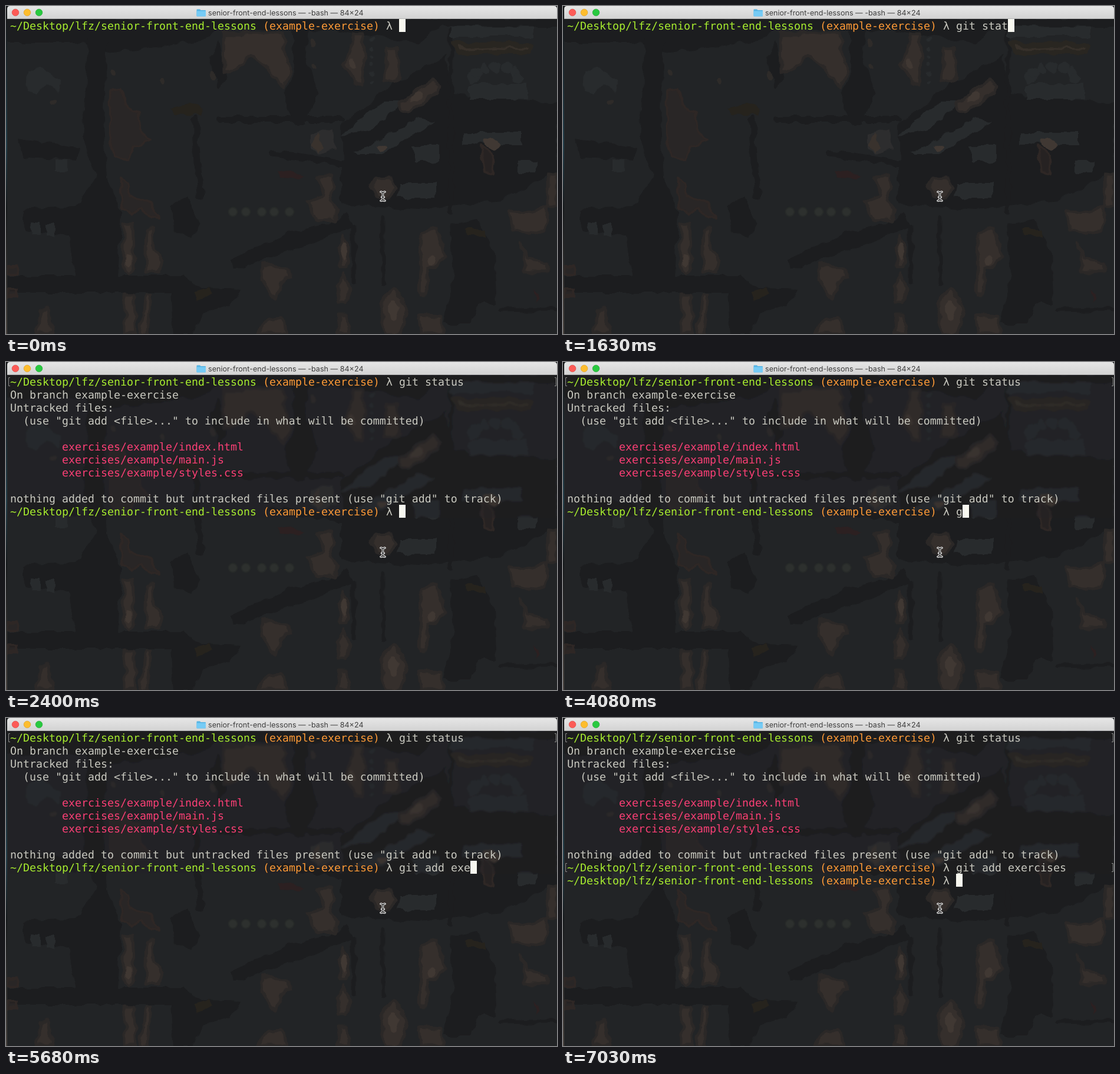
An HTML page that plays this animation: 935 px wide and 556 px high, repeating every 8 s.

```html
<!DOCTYPE html>
<html lang="en">
<head>
<meta charset="utf-8">
<title>Terminal</title>
<style>
  html, body { margin: 0; width: 100%; height: 100%; overflow: hidden; background: #222426; }
  svg { display: block; width: 935px; height: 556px; }
  text { white-space: pre; text-rendering: geometricPrecision; }
  #rows text { font: 18.27px "DejaVu Sans Mono", monospace; font-variant-ligatures: none; fill: #c9c9c0; }
  #rows .path { fill: #a7ec2f; }
  #rows .branch { fill: #fd9a37; }
  #rows .file { fill: #fa3f75; }
  .mark { fill: none; stroke: #8b8c8a; }
  .title { font: 12.6px Inter, sans-serif; fill: #3f3f3f; }
  .dark { fill: #1c1d1f; }
  .darkline { fill: none; stroke: #1c1d1f; stroke-linecap: round; }
  .brown { fill: #352f2c; stroke: #2b2827; stroke-width: 5; stroke-linejoin: round; }
  .rust { fill: #30292680; stroke: #2e2725; stroke-width: 4; stroke-linejoin: round; }
  .grey { fill: #282b2d; }
  .glow { fill: #403833; }
</style>
</head>
<body>
<svg viewBox="0 0 935 556">
  <defs>
    <linearGradient id="bar" x2="0" y2="1">
      <stop stop-color="#e6e6e6"/><stop offset="1" stop-color="#d2d2d2"/>
    </linearGradient>
    <linearGradient id="edge" x2="0" y2="1">
      <stop stop-color="#17191b"/><stop offset=".4" stop-color="#24404c"/>
      <stop offset=".6" stop-color="#15181a"/><stop offset="1" stop-color="#4a4541"/>
    </linearGradient>
    <filter id="wavy" x="0" y="0" width="935" height="556" filterUnits="userSpaceOnUse" color-interpolation-filters="sRGB">
      <feTurbulence type="fractalNoise" baseFrequency=".045" numOctaves="2" seed="4" result="noise"/>
      <feDisplacementMap in="SourceGraphic" in2="noise" scale="14" xChannelSelector="R" yChannelSelector="G"/>
    </filter>
    <filter id="soft" x="0" y="0" width="935" height="556" filterUnits="userSpaceOnUse"><feGaussianBlur stdDeviation="1.6"/></filter>
    <clipPath id="printed"><rect x="4" y="22" width="930" height="242"/></clipPath>
  </defs>

  <g id="scene">
    <rect width="935" height="556" fill="#222426"/>
    <g filter="url(#wavy)">
      <g class="dark">
        <path d="M0 22H935V34H740L700 62 620 52 560 42 360 38 330 60 180 78 130 62 0 62Z"/>
        <path d="M484 40H514L508 90 530 150 506 200H490L470 150 490 110Z"/>
        <path d="M140 60H172L165 190 172 290 196 350 190 460H120L105 390 30 380V345L120 340 155 290 130 225Z"/>
        <path d="M570 200L660 130 745 85 760 150 935 165V280L840 330 700 345 570 335Z"/>
        <path d="M0 458H300L330 478 400 480 380 508 335 520 315 556H285L280 486H0Z"/>
        <path d="M280 335L310 325 330 370 315 395 285 380ZM380 430L480 385 540 370 580 350 590 375 540 395 450 425 390 448Z"/>
        <path d="M752 370L800 360 830 420 835 505H800L790 540H745L760 450Z"/>
        <path d="M20 225L125 240 120 262 30 255ZM360 60L376 120 360 140 345 90Z"/>
      </g>
      <g class="darkline">
        <path stroke-width="10" d="M365 193H570M320 190L330 325M450 250L560 265 620 265"/>
        <path stroke-width="7" d="M590 375V470M640 360V470M840 515H935M755 40V350"/>
      </g>
      <g class="grey">
        <path d="M570 220L640 160 680 160 620 210ZM590 250L700 190 730 195 640 250ZM690 235H735V265H695Z"/>
        <path d="M785 132H885V158H785ZM775 215H875V235H775ZM670 300H730V325H665Z"/>
        <path d="M755 35H895V52H755ZM870 262H900V282H870Z"/>
        <path d="M36 112L60 105 95 125 90 145 70 132 50 150 34 145Z"/>
        <path d="M40 365H58V388H42ZM68 370H82V390H68ZM82 262H104V278H82Z"/>
      </g>
      <g id="ring" class="grey"></g>
      <g class="brown">
        <path d="M369 46H470L472 78 483 110 471 138 455 122 440 101 416 83 398 100 370 116Z"/>
        <path d="M590 47H604L608 95 605 135 590 128 576 100Z"/>
        <path d="M646 70H662L669 120 660 130 642 126Z"/>
        <path d="M670 163L725 126 736 136 732 147 682 180 670 175Z"/>
        <path d="M530 290L552 288 556 310 550 330 562 345 556 362 530 363 512 332 540 320Z"/>
        <path d="M625 293L652 292 662 310 650 326 628 322 620 305Z"/>
        <path d="M855 345L880 350 918 342 915 380 890 388 862 380ZM921 285H935V342H921ZM875 402L885 430 920 435 918 450 880 450Z"/>
        <path d="M705 385L730 378 745 425 730 442 716 445 714 488H703Z"/>
        <path d="M437 437L460 444 480 445 482 460 465 470 456 498 434 465Z"/>
        <path d="M572 390L582 412 577 442H568L563 410ZM572 452L582 480 577 503H567L562 478ZM566 523H578L582 556H562Z"/>
        <path d="M656 479L672 495 680 525 670 556H644L636 520 644 490Z"/>
        <path d="M428 556L445 530 470 527 475 556ZM52 556L56 515 72 512 78 556ZM700 525L740 528V556H705Z"/>
        <path d="M200 370H214L218 445 210 455 200 450ZM238 378H250L252 410 265 430 260 452H236ZM201 488H216L220 556H201ZM236 490H246L240 556H228Z"/>
      </g>
      <g class="rust">
        <path d="M177 142L196 140 205 172 225 180 230 215 244 228 216 238 210 258 182 258 176 210Z"/>
        <path d="M193 291L207 303 212 322 248 333 261 362 246 360 232 343 212 353 198 346Z"/>
        <path d="M805 240L828 250 825 285 812 280ZM2 440H20V455H2ZM2 480H18V492H2Z"/>
      </g>
      <path fill="#36302a" stroke="#292621" stroke-width="8" stroke-linejoin="round" d="M760 62L785 67 830 65 890 67V78L830 76 765 80Z"/>
      <path fill="#2d2d2e" d="M515 217L555 207 558 242 530 252 515 240Z"/>
      <path fill="#39322d" d="M516 235L530 215 538 240 530 250Z"/>
      <path fill="#26231d" d="M280 173L310 166 335 173 330 184 285 182ZM320 485L345 478 350 490 325 500ZM780 378H812V390H785Z"/>
      <path fill="#2c2021" d="M463 282L480 279 505 288 500 293 465 291ZM895 482L905 492 900 502Z"/>
      <g class="glow">
        <ellipse cx="825" cy="233" rx="15" ry="9"/><ellipse cx="697" cy="154" rx="11" ry="6" transform="rotate(-30 697 154)"/>
        <ellipse cx="637" cy="240" rx="9" ry="6"/><ellipse cx="590" cy="98" rx="6" ry="9"/>
        <ellipse cx="724" cy="430" rx="6" ry="10"/><ellipse cx="657" cy="515" rx="10" ry="18"/>
        <ellipse cx="573" cy="415" rx="5" ry="15"/><ellipse cx="208" cy="430" rx="5" ry="12"/>
      </g>
      <g fill="#2e2b29">
        <circle cx="183" cy="113" r="6"/><circle cx="266" cy="128" r="5"/><ellipse cx="77" cy="163" rx="7" ry="4"/>
        <ellipse cx="349" cy="118" rx="5" ry="10"/><ellipse cx="521" cy="62" rx="6" ry="9"/><circle cx="523" cy="103" r="5"/>
      </g>
    </g>
    <g id="lamps" fill="#2d302e" stroke="#272a29" stroke-width="2"></g>
  </g>
  <g id="settled">
    <use href="#scene" clip-path="url(#printed)" filter="url(#soft)"/>
    <rect x="4" y="22" width="930" height="242" fill="#202224" opacity=".22"/>
  </g>

  <rect y="22" width="2" height="534" fill="url(#edge)"/>
  <path d="M0 0H935V10H0Z" fill="#1d1f20"/>
  <path d="M0 22V0H2V22Z" fill="#17191b"/>
  <path d="M2 22V5Q2 0 7 0H930Q935 0 935 5V22Z" fill="url(#bar)"/>
  <path d="M2 21.5H935" stroke="#b5b5b5"/>
  <g stroke-width=".7">
    <circle cx="16" cy="11" r="5.8" fill="#fc5b57" stroke="#df4744"/>
    <circle cx="36" cy="11" r="5.8" fill="#fdbd2e" stroke="#dd9f24"/>
    <circle cx="56" cy="11" r="5.8" fill="#29c940" stroke="#20a932"/>
  </g>
  <path d="M323.500 6.500Q323.500 5.500 324.500 5.500H329L330.500 7H338Q339 7 339 8V16.500Q339 17.500 338 17.500H324.500Q323.500 17.500 323.500 16.500Z" fill="#56b4e4"/>
  <path d="M323.500 8.500H339V16.500Q339 17.500 338 17.500H324.500Q323.500 17.500 323.500 16.500Z" fill="#76cbf5"/>
  <text class="title" x="343" y="16">senior-front-end-lessons — -bash — 84×24</text>

  <g id="rows"></g>
  <rect id="cursor" width="11" height="22" fill="#f8f8f0"/>
  <g fill="none" stroke-linecap="round">
    <path id="beam" d="M636 315Q639 315 639.500 317Q640 315 643 315M639.500 317V328M636 330Q639 330 639.500 328Q640 330 643 330M637.500 324H641.500" stroke="#f4f4f4" stroke-width="3.200"/>
    <use href="#beam" style="stroke:#151515"/>
    <path d="M636 315Q639 315 639.500 317Q640 315 643 315M639.500 317V328M636 330Q639 330 639.500 328Q640 330 643 330M637.500 324H641.500" stroke="#111" stroke-width="1.200"/>
  </g>
</svg>
<script>
  const LOOP = 8000, CELL = 11, LINE = 22, LEFT = 7, TOP = 22, PROMPT_COLS = 60;
  const byId = id => document.getElementById(id);

  function add(parent, tag, attrs = {}, content = '') {
    const el = document.createElementNS('http://www.w3.org/2000/svg', tag);
    for (const name in attrs) el.setAttribute(name, attrs[name]);
    el.textContent = content;
    return parent.appendChild(el);
  }

  for (const x of [385, 407, 434, 455, 481]) add(byId('lamps'), 'circle', { cx: x, cy: 349, r: 7.5 });
  for (let i = 0; i < 7; i++) {
    const a = Math.PI * (1 + i / 6);
    add(byId('ring'), 'circle', { cx: 831 + 38 * Math.cos(a), cy: 122 + 18 * Math.sin(a), r: 9 });
  }
  for (let i = 0; i < 6; i++) add(byId('ring'), 'circle', { cx: 620, cy: 58 + 14 * i, r: 3.5 });

  const timed = [{ el: byId('settled'), from: 2400 }];
  const rows = byId('rows');

  function print(from, row, text, kind = '', col = 0) {
    const el = add(rows, 'text', { x: LEFT + col * CELL, y: TOP + row * LINE + 18, class: kind }, text);
    timed.push({ el, from });
    return el;
  }

  function prompt(from, row) {
    print(from, row, '~/Desktop/lfz/senior-front-end-lessons', 'path');
    print(from, row, '(example-exercise)', 'branch', 39);
    print(from, row, 'λ', '', 58);
  }

  function mark(from, row) {
    const y = TOP + row * LINE + 4;
    const d = `M7 ${y}.5H4.5V${y + 14}.5H7M931 ${y}.5H933.5V${y + 14}.5H931`;
    timed.push({ el: add(rows, 'path', { class: 'mark', d }), from });
  }

  const commands = [
    { row: 0, text: 'git status', enter: 2340, done: 2400, nextRow: 10,
      keys: [900, 990, 1080, 1160, 1280, 1400, 1580, 1630, 1810, 1920] },
    { row: 10, text: 'git add exercises', enter: 6970, done: 7030, nextRow: 11,
      keys: [4080, 4260, 4350, 4430, 4670, 4850, 5030, 5150, 5270, 5510, 5680, 5800, 6030, 6140, 6260, 6380, 6560] }
  ];

  prompt(0, 0);
  for (const cmd of commands) {
    cmd.el = print(0, cmd.row, '', '', PROMPT_COLS);
    mark(cmd.enter, cmd.row);
    prompt(cmd.done, cmd.nextRow);
  }
  print(2400, 1, 'On branch example-exercise');
  print(2400, 2, 'Untracked files:');
  print(2400, 3, '(use "git add <file>..." to include in what will be committed)', '', 2);
  ['index.html', 'main.js', 'styles.css'].forEach((name, i) =>
    print(2400, 5 + i, 'exercises/example/' + name, 'file', 8));
  print(2400, 9, 'nothing added to commit but untracked files present (use "git add" to track)');

  function render(t) {
    for (const { el, from } of timed) el.style.display = t >= from ? '' : 'none';
    let row = 0, col = PROMPT_COLS;
    for (const cmd of commands) {
      const typed = cmd.keys.filter(key => key <= t).length;
      cmd.el.textContent = cmd.text.slice(0, typed);
      if (t >= cmd.done) [row, col] = [cmd.nextRow, PROMPT_COLS];
      else if (t >= cmd.enter) [row, col] = [cmd.row + 1, 0];
      else if (typed) [row, col] = [cmd.row, PROMPT_COLS + typed];
    }
    byId('cursor').setAttribute('x', LEFT + col * CELL);
    byId('cursor').setAttribute('y', TOP + row * LINE);
  }

  const start = performance.now();
  function tick() {
    render((performance.now() - start) % LOOP);
    requestAnimationFrame(tick);
  }
  tick();
</script>
</body>
</html>
```
